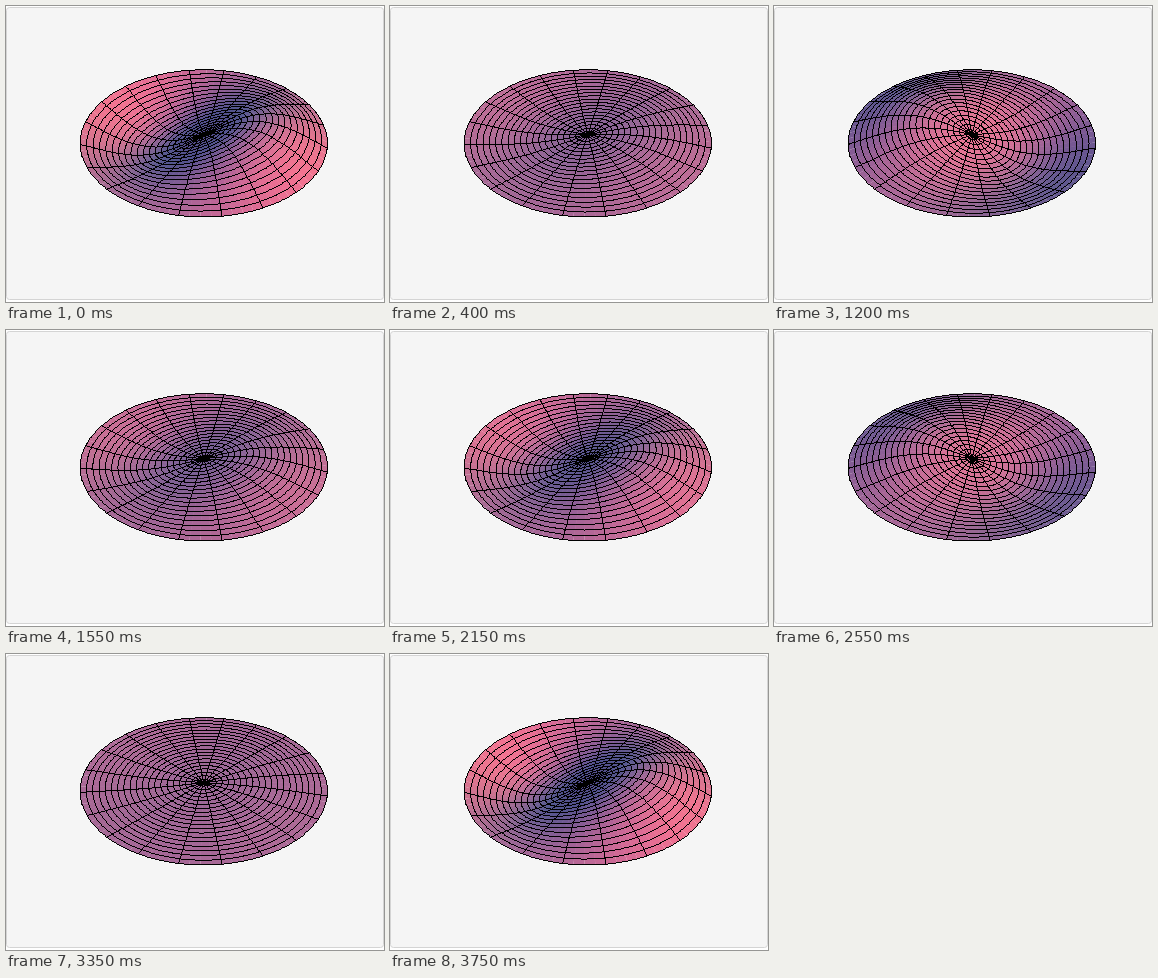
An HTML page with a canvas that plays this animation: 378 px wide and 296 px high, repeating every 3.8 s.

```html
<!DOCTYPE html>
<html lang="en">
<head>
<meta charset="utf-8">
<title>Vibrating membrane</title>
<style>
html, body { margin: 0; width: 100%; height: 100%; overflow: hidden; background: #fff; }
canvas { display: block; }
</style>
</head>
<body>
<canvas id="stage" width="378" height="296"></canvas>
<script>
const ctx = document.getElementById('stage').getContext('2d');

const RINGS = 20, SPOKES = 20, SUB = 4;   // SUB facets between two spokes
const FACETS = SPOKES * SUB;
const LOOP = 3800, STEP = 50, PERIOD = 1900;
const K = 3.8317, AMP = 0.34;             // first zero of J1, wave height

// Camera, in units of the membrane's diameter
const EYE = [1.3, -2.4, 2];
const DIST = Math.hypot(...EYE);
const SIN = EYE[2] / DIST, COS = Math.sqrt(1 - SIN * SIN);
const TURN = Math.atan2(EYE[1], EYE[0]) + Math.PI / 2;
const SCALE = 831, CX = 197.8, CY = 128.6;

function besselJ1(x) {
  let term = x / 2, sum = term;
  for (let m = 1; m < 12; m++) {
    term *= -x * x / (4 * m * (m + 1));
    sum += term;
  }
  return sum;
}

const profile = Array.from({ length: RINGS + 1 }, (_, i) => AMP * besselJ1(K * i / RINGS));

// View space: x right, y up, z towards the eye
function vertex(i, j, phase) {
  const angle = j * 2 * Math.PI / FACETS;
  const r = i / RINGS / 2;
  const x = r * Math.cos(angle - TURN);
  const depth = r * Math.sin(angle - TURN);
  const h = phase * profile[i] * Math.cos(angle) / 2;
  const v = [x, depth * SIN + h * COS, h * SIN - depth * COS];
  const s = SCALE / (DIST - v[2]);
  return { v, x: CX + v[0] * s, y: CY - v[1] * s };
}

const minus = (a, b) => a.map((c, i) => c - b[i]);

// Ambient light plus red from the right, green from the corner, blue from above
function shade(a, b, c, d) {
  const [px, py, pz] = minus(c.v, a.v), [qx, qy, qz] = minus(d.v, b.v);
  const n = [py * qz - pz * qy, pz * qx - px * qz, px * qy - py * qx];
  const len = Math.hypot(...n) * Math.sign(n[2]);
  const [x, y, z] = n.map(c => c / len);
  const light = [
    0.31 + 0.8 * Math.max(0, x + z) / Math.SQRT2,
    0.18 + 0.28 * Math.max(0, x + y + z) / Math.sqrt(3),
    0.31 + 0.28 * Math.max(0, y + z) / Math.SQRT2
  ];
  return `rgb(${light.map(c => Math.round(255 * Math.min(1, c))).join()})`;
}

// Crisp one-pixel line
function line(a, b) {
  const dx = b.x - a.x, dy = b.y - a.y;
  const n = Math.max(1, Math.ceil(Math.max(Math.abs(dx), Math.abs(dy))));
  for (let i = 0; i <= n; i++) {
    ctx.fillRect(Math.floor(a.x + dx * i / n), Math.floor(a.y + dy * i / n), 1, 1);
  }
}

function panel() {
  ctx.fillStyle = '#fff';
  ctx.fillRect(0, 0, 378, 296);
  ctx.beginPath();
  ctx.roundRect(0.5, 1.5, 377, 292, 3);
  ctx.fillStyle = '#f5f5f5';
  ctx.fill();
  ctx.lineWidth = 1;
  ctx.strokeStyle = '#d4d4d4';
  ctx.stroke();
}

function draw(time) {
  const phase = Math.cos(2 * Math.PI * time / PERIOD);
  const grid = profile.map((_, i) =>
    Array.from({ length: FACETS + 1 }, (_, j) => vertex(i, j, phase)));

  panel();
  ctx.lineWidth = 0.6;
  for (let i = 0; i < RINGS; i++) {
    for (let j = 0; j < FACETS; j++) {
      const quad = [grid[i][j], grid[i + 1][j], grid[i + 1][j + 1], grid[i][j + 1]];
      ctx.fillStyle = ctx.strokeStyle = shade(...quad);
      ctx.beginPath();
      quad.forEach(p => ctx.lineTo(p.x, p.y));
      ctx.closePath();
      ctx.fill();
      if (i < RINGS - 1) ctx.stroke();    // closes the seams
    }
  }
  ctx.fillStyle = '#000';
  for (let i = 0; i < RINGS; i++) {
    for (let j = 0; j < FACETS; j++) {
      if (j % SUB === 0) line(grid[i][j], grid[i + 1][j]);
      line(grid[i + 1][j], grid[i + 1][j + 1]);
    }
  }
}

const start = performance.now();
let shown = -1;
function tick(now) {
  const time = Math.floor(Math.max(0, now - start) % LOOP / STEP) * STEP;
  if (time !== shown) draw(shown = time);
  requestAnimationFrame(tick);
}
draw(0);
requestAnimationFrame(tick);
</script>
</body>
</html>
```
